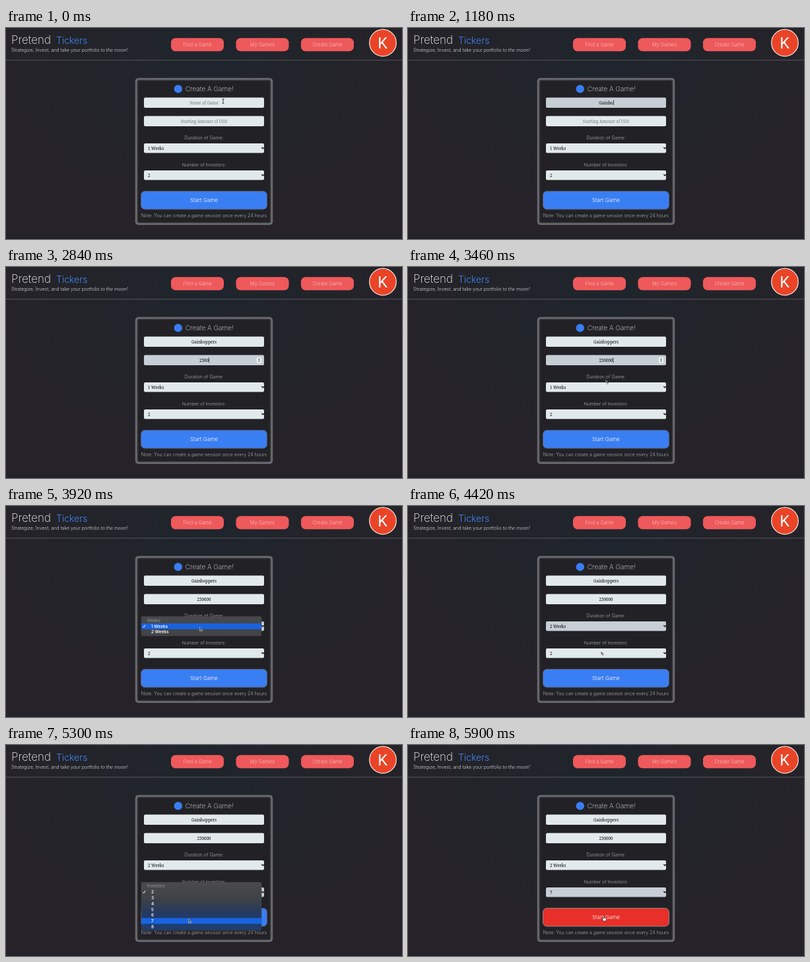
Animation, 600 px wide and 320 px high, one loop 5920 ms. Source, as an HTML page:

```html
<!DOCTYPE html>
<html lang="en">
<head>
<meta charset="utf-8">
<title>Create a game</title>
<style>
html, body { margin: 0; width: 100%; height: 100%; overflow: hidden; background: #242329; }
svg { display: block; width: 600px; height: 320px; }
text { font: 300 7px Inter, sans-serif; fill: #aeadb1; white-space: pre; }
.mid { text-anchor: middle; }
.nav { font-size: 7.4px; fill: #f9bdb8; }
.field { font: 500 6.2px "Noto Serif", serif; fill: #050607; }
.menu text { font: 600 6.4px Inter, sans-serif; fill: #f4f5f7; }
.menu .head { font-weight: 400; fill: #96979a; }
</style>
</head>
<body>
<svg id="stage" viewBox="0 0 600 320">
  <defs>
    <radialGradient id="page" gradientUnits="userSpaceOnUse" cx="0" cy="0" r="320" gradientTransform="translate(300 55) scale(1 .7)">
      <stop offset="0" stop-color="#1f252d"/><stop offset=".5" stop-color="#22242a"/><stop offset="1" stop-color="#252329"/>
    </radialGradient>
    <linearGradient id="weeksBg" x2="0" y2="1">
      <stop offset="0" stop-color="#48494a"/><stop offset="1" stop-color="#424347"/>
    </linearGradient>
    <linearGradient id="investorsBg" x2="0" y2="1">
      <stop offset="0" stop-color="#4b4b4c"/><stop offset=".35" stop-color="#3e4146"/>
      <stop offset=".65" stop-color="#233a63"/><stop offset=".85" stop-color="#1f3d73"/><stop offset="1" stop-color="#243d68"/>
    </linearGradient>
    <filter id="glow" x="-10%" y="-10%" width="120%" height="120%"><feGaussianBlur stdDeviation=".9"/></filter>
  </defs>
  <rect width="600" height="320" fill="url(#page)"/>
  <rect y="48.3" width="600" height="1" fill="#55565b"/>
  <rect y="318.5" width="600" height="1.5" fill="#1c2030"/>
  <text x="8" y="23.5" style="font-size:17px;font-weight:200;fill:#f3f3f5">Pretend</text>
  <text x="76" y="23.5" style="font-size:14px;fill:#4285f4">Tickers</text>
  <text x="8" y="36.3" style="font-size:7.05px;fill:#d6d6d9">Strategize, Invest, and take your portfolio <tspan font-style="italic">to the moon!</tspan></text>
  <g id="nav"></g>
  <circle cx="571" cy="22.5" r="20.3" fill="#ea4428" stroke="#f4e9e7" stroke-width="1.2"/>
  <text x="570.5" y="30.7" class="mid" style="font:400 23.5px Roboto,sans-serif;fill:#fff">K</text>

  <rect x="197.5" y="77.5" width="205" height="219.5" rx="3" fill="#212126" stroke="#85858a" stroke-width="1.6" filter="url(#glow)"/>
  <rect x="197" y="77" width="206" height="220.5" rx="3" fill="none" stroke="#8e8e93" stroke-width=".9"/>
  <circle cx="260.8" cy="92.4" r="6.2" fill="#3a7df2"/>
  <text x="308.3" y="95.7" class="mid" style="font-size:10.1px;font-weight:200;fill:#e6e6ea">Create A Game!</text>
  <g id="form"></g>
  <text x="300" y="169" class="mid">Duration of Game:</text>
  <text x="300" y="209.6" class="mid" style="font-size:6.8px">Number of Investors:</text>
  <rect id="start" x="204.5" y="247.5" width="191" height="27.5" rx="6"/>
  <text x="300" y="264" class="mid" style="font-size:8.1px;fill:#fff">Start Game</text>
  <text x="300" y="287.4" class="mid">Note: You can create a game session once every 24 hours</text>

  <g id="spinner">
    <rect x="380" y="137" width="7" height="8.5" rx="1.5" fill="#f1f2f3"/>
    <path d="M382 140.4l1.5-1.8 1.5 1.8zM382 142l1.5 1.8 1.5-1.8z" fill="#333"/>
  </g>
  <rect id="caret" width=".7" height="8" fill="#111"/>
  <g id="menus"></g>
  <path id="ibeam" d="M-1.5-3.5Q0-3.5 0-2.5Q0-3.5 1.5-3.5M0-2.5V2.5M-1.5 3.5Q0 3.5 0 2.5Q0 3.5 1.5 3.5" fill="none" stroke="#111" stroke-width=".8"/>
  <path id="arrow" d="M-.5-3V3.1L1-.1 2 4.2 3.2 3.7 2.2 1.6H4Z" fill="#0b0b0b" stroke="#f2f2f2" stroke-width=".5"/>
  <path id="hand" d="M-1-3.5Q-.3-4.3.4-3.5V-.7L2.8 0Q3.7.4 3.4 1.8L2.7 4H-.8L-2.9 1Q-2.6-.1-1 .9Z" fill="#fff" stroke="#111" stroke-width=".6"/>
</svg>
<script>
const LOOP = 5920, NAME = "Gainhoppers", AMOUNT = "250000";
const T = { name: 460, amount: 1960, weeks: 3620, weeksSet: 4180, count: 4560, countSet: 5420 };
const el = id => document.getElementById(id);
const between = (t, a, b) => t >= a && t < b;

function add(parent, tag, attrs, text = "") {
  const node = document.createElementNS("http://www.w3.org/2000/svg", tag);
  put(node, attrs);
  node.textContent = text;
  return parent.appendChild(node);
}
const show = (node, on) => node.setAttribute("visibility", on ? "visible" : "hidden");
function put(node, attrs) { for (const key in attrs) node.setAttribute(key, attrs[key]); }

[[250, "Find a Game"], [348.5, "My Games"], [447, "Create Game"]].forEach(([x, label]) => {
  add(el("nav"), "rect", { x, y: 15.3, width: 80, height: 20, rx: 7, fill: "#ee595b" });
  add(el("nav"), "text", { x: x + 40, y: 27.9, class: "mid nav" }, label);
});

function field(y, isSelect) {
  const box = add(el("form"), "rect", { x: 209, y, width: 182, height: isSelect ? 14.5 : 15.5, rx: 2 });
  const text = add(el("form"), "text", isSelect
    ? { x: 215, y: y + 10.2, class: "field" }
    : { x: 300, y: y + 10, class: "field mid" });
  if (isSelect) add(el("form"), "path", {
    d: `M387.3 ${y + 6}l1.9 1.9 1.9-1.9`, fill: "none", stroke: "#08090a", "stroke-width": 1.2
  });
  return { box, text };
}
const nameField = field(105.5), amountField = field(133.5);
const weeksField = field(175, true), countField = field(216, true);

const PITCH = 8.75;
function menu(y, height, head, items, bg) {
  const g = add(el("menus"), "g", { class: "menu" });
  add(g, "rect", { x: 204.5, y: y + .5, width: 183, height, rx: 2, fill: "#000", opacity: .3 });
  add(g, "rect", { x: 205, y, width: 182, height, rx: 2, fill: `url(#${bg})`, stroke: "#55565a", "stroke-width": .4 });
  const bar = add(g, "rect", { x: 205, width: 182, height: PITCH, fill: "#1863e0" });
  add(g, "text", { x: 213.5, y: y + 8, class: "head" }, head);
  items.forEach((item, i) => add(g, "text", { x: 220, y: y + 17 + i * PITCH }, item));
  add(g, "path", { d: `M207.5 ${y + 14.7}l1.3 1.8 2.2-4`, fill: "none", stroke: "#fff", "stroke-width": .9 });
  return (open, mouseY) => {
    show(g, open);
    const row = Math.floor((mouseY - y - 10.4) / PITCH);
    show(bar, open && row >= 0 && row < items.length);
    bar.setAttribute("y", y + 10.4 + row * PITCH);
  };
}
const weeksMenu = menu(167.7, 29.3, "Weeks", ["1 Weeks", "2 Weeks"], "weeksBg");
const countMenu = menu(208.3, 73, "Investors", [2, 3, 4, 5, 6, 7, 8], "investorsBg");

// Pointer stops: time, x, y
const path = [
  [0, 329, 111], [1700, 329, 111], [1940, 325, 141], [3220, 325, 141], [3560, 294, 183],
  [3800, 294, 184], [3920, 294, 186.5], [4060, 294, 190.5], [4200, 294, 191], [4400, 293, 223.5],
  [4660, 293, 223.5], [5180, 278, 266], [5300, 277, 266.5], [5460, 277, 267], [5720, 297, 263], [LOOP, 297, 263]
];
function pointer(t) {
  const i = path.findIndex(p => p[0] > t);
  const [a, x, y] = path[i - 1], [b, u, v] = path[i];
  const k = (t - a) / (b - a), e = k * k * (3 - 2 * k);
  return [x + (u - x) * e, y + (v - y) * e];
}

const typed = (word, t, start, step) => word.slice(0, Math.max(0, Math.floor((t - start) / step)));

function setField({ box, text }, value, focused, hint) {
  box.setAttribute("fill", focused ? "#c7ced5" : "#e2e9ec");
  text.textContent = value || hint;
  text.style.fill = value ? "" : "#73777b";
}

function draw(t) {
  const [x, y] = pointer(t);
  const onName = between(t, T.name, T.amount), onAmount = between(t, T.amount, T.weeks);
  const name = typed(NAME, t, 650, 85), amount = typed(AMOUNT, t, 2240, 140);
  setField(nameField, name, onName, "Name of Game");
  setField(amountField, amount, onAmount, "Starting Amount of USD");
  setField(weeksField, t < T.weeksSet ? "1 Weeks" : "2 Weeks", between(t, T.weeks, T.count));
  setField(countField, t < T.countSet ? "2" : "7", t >= T.count);

  const active = onName ? nameField : amountField;
  const value = onName ? name : amount;
  const half = value ? active.text.getComputedTextLength() / 2 : 0;
  put(el("caret"), { x: 300 + half + .3, y: onName ? 109.2 : 137.2 });
  show(el("caret"), onName || onAmount);
  show(el("spinner"), onAmount);

  weeksMenu(between(t, T.weeks, T.weeksSet), y - 2);
  countMenu(between(t, T.count, T.countSet), y);

  const hover = Math.min(1, Math.max(0, (t - T.countSet) / 160));
  const mix = (a, b) => Math.round(a + (b - a) * hover);
  put(el("start"), {
    fill: `rgb(${mix(58, 232)},${mix(126, 47)},${mix(243, 41)})`,
    stroke: hover ? "#8b8589" : "#57596a", "stroke-width": 1
  });

  const hidden = between(t, 640, 1700) || between(t, 2200, 3200);
  const kind = t >= T.countSet ? "hand" : t < 3320 ? "ibeam" : "arrow";
  for (const id of ["ibeam", "arrow", "hand"]) {
    put(el(id), { transform: `translate(${x} ${y})` });
    show(el(id), !hidden && id === kind);
  }
}

const begin = performance.now();
function tick() {
  draw((performance.now() - begin) % LOOP);
  requestAnimationFrame(tick);
}
tick();
</script>
</body>
</html>
```
